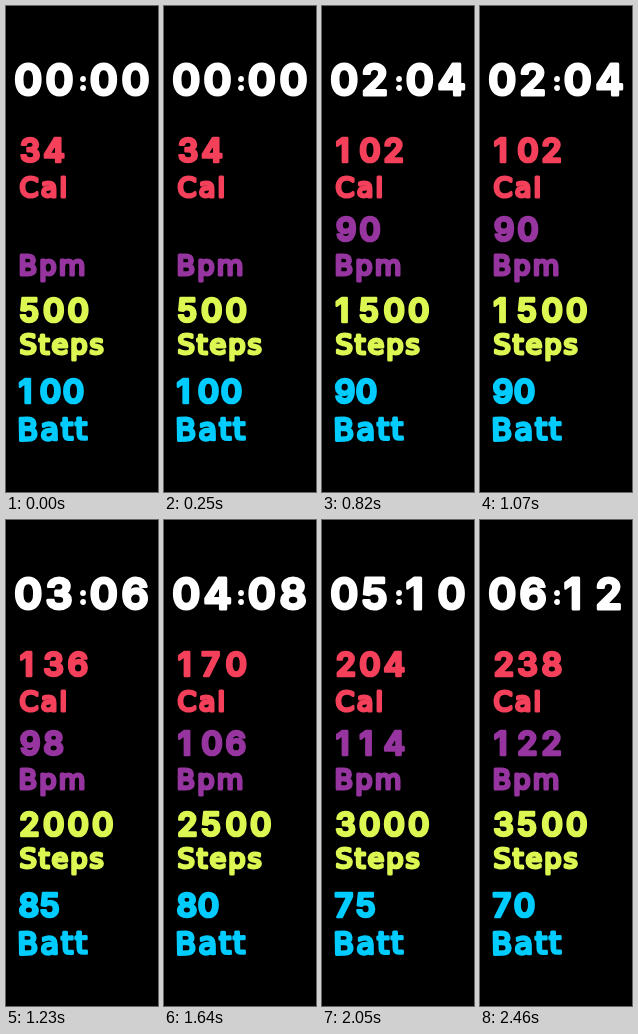
These frames come from a looping animation (152x486 px, 2.87 s). An HTML page:

```html
<!DOCTYPE html>
<html lang="en">
<head>
<meta charset="utf-8">
<title>Watch face</title>
<style>
  html, body { margin: 0; width: 100%; height: 100%; overflow: hidden; background: #000; }
  svg { display: block; width: 100vw; height: 100vh; }
  /* A thick round-joined outline gives the letters rounded ends. */
  text {
    fill: currentColor;
    stroke: currentColor;
    stroke-linejoin: round;
    stroke-linecap: round;
  }
  .digits { font: 600 32.5px Inter, sans-serif; stroke-width: 2.6px; }
  .clock { font-size: 42.5px; stroke-width: 3px; }
  .colon { font: 700 24px Inter, sans-serif; text-anchor: middle; stroke-width: 1.8px; }
  .label { font: 27.3px "DejaVu Sans", sans-serif; stroke-width: 3px; letter-spacing: 2px; }
  .batt .label { font-size: 30.5px; }
  .time { color: #fff; }
  .cal { color: #f4405a; }
  .bpm { color: #9735a0; }
  .steps { color: #dcf751; }
  .batt { color: #00ccff; }
</style>
</head>
<body>
<svg viewBox="0 0 152 486">
  <g class="time">
    <text id="clock" class="digits clock" x="8.3 39.5 83.7 115.5" y="89"></text>
    <text class="colon" x="76.9" y="84">:</text>
  </g>
  <g class="cal">
    <text id="cal" class="digits" x="13.8 37.2 61.6" y="156.4"></text>
    <text class="label" x="13.6" y="190.5">Cal</text>
  </g>
  <g class="bpm">
    <text id="bpm" class="digits" x="13.8 37.2 61.6" y="234.9"></text>
    <text class="label" x="12.6" y="269.1">Bpm</text>
  </g>
  <g class="steps">
    <text id="steps" class="digits" x="13.3 36.9 61.4 86.1" y="316.3"></text>
    <text class="label" x="13.4" y="348">Steps</text>
  </g>
  <g class="batt">
    <text id="batt" class="digits" x="12.6 33.8 56.8" y="396.8"></text>
    <text class="label" x="11.6" y="434.5" transform="rotate(-1 13 434)">Batt</text>
  </g>
</svg>
<script>
  const STEP_MS = 410, STEPS = 7;
  const pad = n => String(n).padStart(2, "0");

  const readings = {
    clock: k => pad(k) + pad(2 * k),
    cal: k => 34 * (k + 1),
    bpm: k => k < 2 ? "" : 90 + 8 * (k - 2),
    steps: k => 500 * (k + 1),
    batt: k => 100 - 5 * k
  };

  let shown = -1;
  function draw() {
    const k = Math.floor(performance.now() / STEP_MS) % STEPS;
    if (k !== shown) {
      for (const id in readings) {
        document.getElementById(id).textContent = readings[id](k);
      }
      shown = k;
    }
    requestAnimationFrame(draw);
  }
  draw();
</script>
</body>
</html>
```
